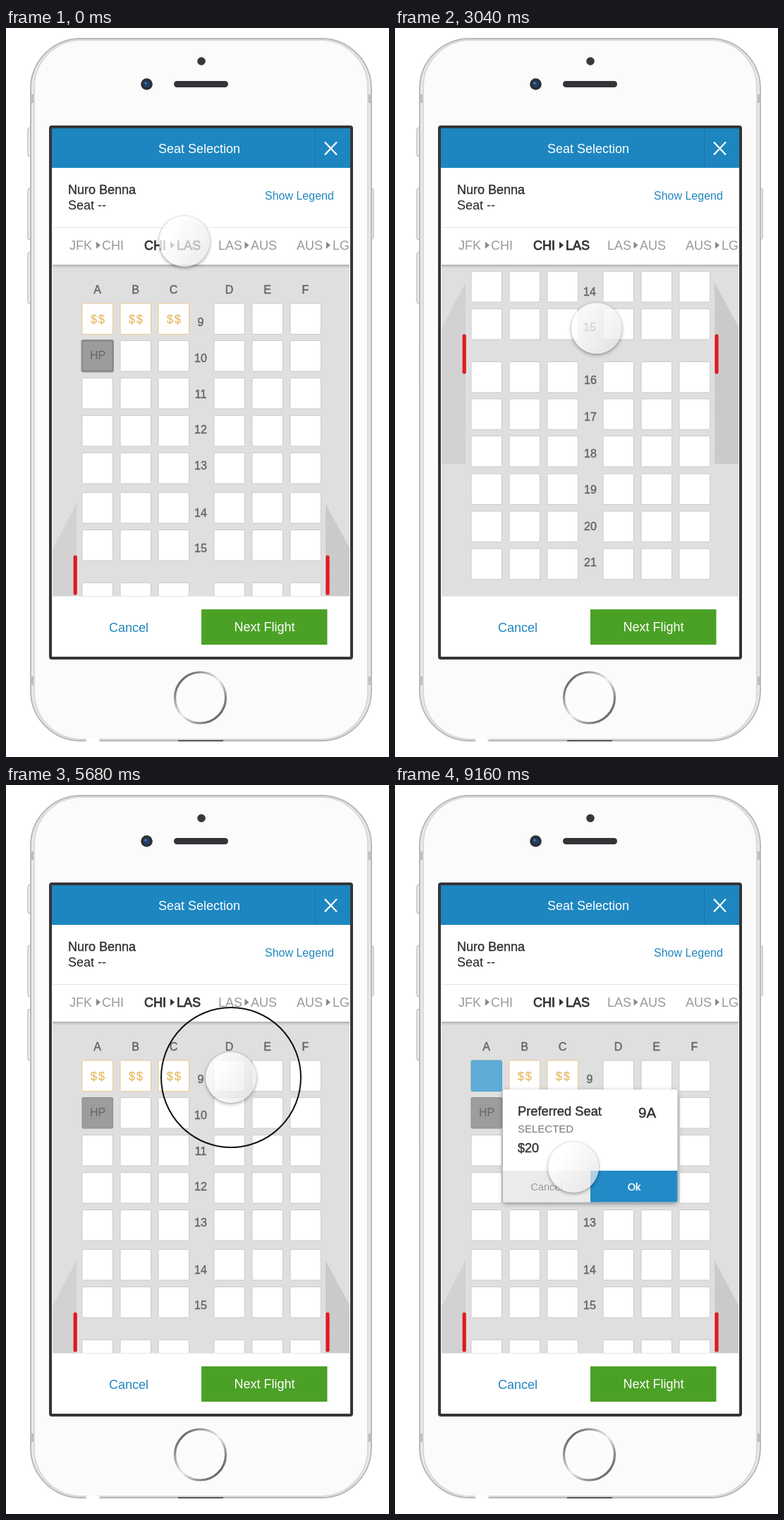
Animation, 543 px wide and 1032 px high, one loop 9.24 s. Source, as an HTML page:

```html
<!DOCTYPE html>
<html lang="en">
<head>
<meta charset="utf-8">
<title>Seat Selection</title>
<style>
html, body { margin: 0; width: 100%; height: 100%; overflow: hidden; background: #fff; }
#stage { position: absolute; left: 0; top: 0; width: 543px; height: 1032px; overflow: hidden; }
svg { display: block; }
text { font-family: "Liberation Sans", Arial, sans-serif; font-size: 18px; fill: currentColor; }
.mid { text-anchor: middle; }
.med { stroke: currentColor; stroke-width: .45px; }
.link { color: #2086bd; }
.dark { color: #333; }
.tab { color: #999; }
.grey { color: #666; font-size: 16px; }
.card { filter: drop-shadow(0 2px 3px rgba(0,0,0,.38)); }
#ring, #cursor { position: absolute; left: 0; top: 0; border-radius: 50%; }
#ring { width: 200px; height: 200px; margin: -100px; box-sizing: border-box; }
#cursor {
  width: 72px; height: 72px; margin: -36px;
  background: linear-gradient(125deg, rgba(255,255,255,.78) 25%, rgba(232,232,232,.72) 85%);
  box-shadow: 0 2px 5px rgba(0,0,0,.32), 0 0 2px rgba(0,0,0,.22);
}
</style>
</head>
<body>
<div id="stage">
<svg width="543" height="1032" viewBox="0 0 543 1032">
  <defs>
    <linearGradient id="metal" x2="1" y2="1">
      <stop offset="0" stop-color="#333"/><stop offset=".3" stop-color="#aaa"/>
      <stop offset=".5" stop-color="#eee"/><stop offset=".75" stop-color="#888"/>
      <stop offset="1" stop-color="#444"/>
    </linearGradient>
    <linearGradient id="shade" x2="0" y2="1">
      <stop offset="0" stop-color="#000" stop-opacity=".22"/><stop offset="1" stop-color="#000" stop-opacity="0"/>
    </linearGradient>
    <linearGradient id="wing" x2="1" y2="0">
      <stop offset="0" stop-color="#d2d2d2"/><stop offset="1" stop-color="#cacaca"/>
    </linearGradient>
    <clipPath id="map"><rect x="66" y="335" width="421" height="469"/></clipPath>
    <clipPath id="screen"><rect x="66" y="142" width="420.5" height="748"/></clipPath>
  </defs>

  <!-- phone -->
  <g fill="#eee" stroke="#aaa">
    <rect x="31" y="141.5" width="5" height="40" rx="2"/>
    <rect x="31" y="227.5" width="5" height="72" rx="2"/>
    <rect x="31" y="317.5" width="5" height="72" rx="2"/>
    <rect x="516" y="227.5" width="5" height="71" rx="2"/>
  </g>
  <rect x="35" y="15" width="483" height="994" rx="71" fill="#e9e9ea" stroke="#b9b9ba" stroke-width="2"/>
  <path d="M34 94h7v12h-7zM512 94h7v12h-7zM34 918h7v12h-7zM512 918h7v12h-7z" fill="#bdbdbd"/>
  <rect x="40" y="17" width="473" height="990" rx="67" fill="#fbfbfc" stroke="#d9d9db" stroke-width="2"/>
  <path d="M244 1009h64" stroke="#555" stroke-width="2"/>
  <ellipse cx="123" cy="1008" rx="10" ry="3" fill="#fff"/>
  <circle cx="277" cy="47" r="5.8" fill="#38363a"/>
  <rect x="238" y="75" width="77" height="9" rx="4.5" fill="#353337"/>
  <circle cx="199.500" cy="79.500" r="8.300" fill="#2d2f38"/>
  <circle cx="199.500" cy="79.500" r="4.500" fill="#20416b"/>
  <circle cx="198" cy="78" r="1.500" fill="#5c86b8"/>
  <circle cx="275.500" cy="948" r="36" fill="#fcfcfd" stroke="url(#metal)" stroke-width="3.200"/>
  <rect x="63" y="140" width="427" height="752" rx="2" fill="#fff" stroke="#353538" stroke-width="4"/>

  <!-- seat map -->
  <g clip-path="url(#map)">
    <rect x="65" y="335" width="423" height="469" fill="#dfdfdf"/>
    <g id="seats">
      <path d="M100 673V930H66V738ZM453 673V930H488V738Z" fill="url(#wing)"/>
      <path d="M98.200 749V800M456 749V800" stroke="#e01a1f" stroke-width="5.200" stroke-linecap="round"/>
    </g>
    <rect x="65" y="335" width="423" height="5" fill="url(#shade)"/>
  </g>

  <!-- header, tabs and footer -->
  <rect x="65" y="142" width="423" height="56" fill="#1d86c0"/>
  <path d="M438.500 142v56" stroke="#1874a8"/>
  <path d="M452 161.500l17 18m0-18l-17 18" stroke="#fff" stroke-width="2.300"/>
  <text class="mid" x="274" y="177" color="#fff">Seat Selection</text>
  <text class="dark med" x="88" y="235">Nuro Benna</text>
  <text x="88" y="256.500" color="#222">Seat --</text>
  <text class="link" x="367" y="243" style="font-size:16px">Show Legend</text>
  <path d="M66 282.500h421" stroke="#e4e4e4"/>
  <g id="tabs" clip-path="url(#screen)"></g>
  <path d="M66 804.500h421" stroke="#e8e8e8"/>
  <text class="link mid" x="174" y="855">Cancel</text>
  <rect x="277" y="823" width="178.500" height="50" fill="#4ba126"/>
  <text class="mid" x="366.500" y="854" color="#fff">Next Flight</text>

  <!-- pop-ups -->
  <g id="dialog">
    <g class="card"><rect x="153" y="431" width="247.500" height="159.500" rx="3" fill="#fff"/></g>
    <path d="M153 546h124v44.500h-121a3 3 0 0 1-3-3z" fill="#ebebeb"/>
    <path d="M277 546h123.500v41.500a3 3 0 0 1-3 3H277z" fill="#228ac6"/>
    <text class="dark med" x="174" y="468" style="font-size:18.300px">Preferred Seat</text>
    <text class="dark med" x="345" y="471" style="font-size:20.500px">9A</text>
    <text x="174" y="492" color="#777" style="font-size:15px">SELECTED</text>
    <text class="dark med" x="174" y="520">$20</text>
    <text class="mid" x="215" y="574" color="#999" style="font-size:14.500px">Cancel</text>
    <text class="mid med" x="339" y="574" color="#fff" style="font-size:14.500px">Ok</text>
  </g>
  <g id="tip">
    <g class="card"><rect x="276" y="402" width="93" height="71" rx="2" fill="#fff"/></g>
    <text class="dark mid med" x="322.500" y="433">9D</text>
    <text class="mid" x="322.500" y="452" color="#666" style="font-size:12.800px">SELECTED</text>
  </g>
</svg>
<div id="ring"></div>
<div id="cursor"></div>
</div>
<script>
const LOOP = 9240;
const $ = id => document.getElementById(id);

function add(parent, tag, attrs, label) {
  const el = document.createElementNS('http://www.w3.org/2000/svg', tag);
  for (const k in attrs) el.setAttribute(k, attrs[k]);
  if (label !== undefined) el.textContent = label;
  parent.appendChild(el);
  return el;
}

// Smooth monotone curve through [time, value] points.
function track(...pts) {
  const n = pts.length;
  const slope = i => (pts[i + 1][1] - pts[i][1]) / (pts[i + 1][0] - pts[i][0]);
  const tan = pts.map((p, i) => {
    if (i === 0 || i === n - 1) return 0;
    const a = slope(i - 1), b = slope(i);
    return a * b > 0 ? 2 * a * b / (a + b) : 0;
  });
  return t => {
    if (t <= pts[0][0]) return pts[0][1];
    if (t >= pts[n - 1][0]) return pts[n - 1][1];
    let i = 0;
    while (t > pts[i + 1][0]) i++;
    const [t0, a] = pts[i], [t1, b] = pts[i + 1];
    const h = t1 - t0, u = (t - t0) / h, u2 = u * u, u3 = u2 * u;
    return a * (2 * u3 - 3 * u2 + 1) + b * (3 * u2 - 2 * u3)
      + h * (tan[i] * (u3 - 2 * u2 + u) + tan[i + 1] * (u3 - u2));
  };
}

// Seats
const seats = $('seats');
const cols = [108, 162, 216, 295, 349, 403];
const rowTops = [390, 442.5, 495.5, 548.5, 601.5, 657.5, 710.5, 785.5, 838, 890.5, 944, 997, 1050];
const rowBases = [422, 473, 524, 574, 625, 692, 742, 817, 869, 921, 972, 1024, 1075];
const seat = (x, y, fill, stroke) =>
  add(seats, 'rect', { x, y, width: 43.5, height: 43.5, rx: 1.5, fill, stroke });

cols.forEach((x, i) =>
  add(seats, 'text', { class: 'mid med grey', x: x + 21.5, y: 376 }, 'ABCDEF'[i]));
let hp;
rowTops.forEach((y, r) => {
  add(seats, 'text', { class: 'mid med grey', x: r < 7 ? 276 : 277, y: rowBases[r] }, r + 9);
  cols.forEach((x, c) => {
    if (r === 1 && c === 0) {
      hp = seat(x, y, '#9c9c9c', '#8d8d8d');
      add(seats, 'text', { class: 'mid grey', x: x + 22, y: 469 }, 'HP');
      return;
    }
    const paid = r === 0 && c < 3;
    seat(x, y, '#fff', paid ? '#ecca8c' : '#cbcbcb');
    if (paid) add(seats, 'text', {
      class: 'mid med', x: x + 23, y: 417.5, color: '#e9bf70',
      style: 'font-size:16px;letter-spacing:2px'
    }, '$$');
  });
});
const seatD = seat(cols[3], 390, '#5eadd8', '#55a2cc');
const seatA = seat(cols[0], 390, '#5eadd8', '#55a2cc');

// Flight tabs: start x, arrow x, end x
[['JFK', 'CHI', 90, 128, 136], ['CHI', 'LAS', 196, 233, 242],
 ['LAS', 'AUS', 301, 338.5, 347], ['AUS', 'LGA', 412, 454, 463]].forEach(([from, to, x, ax, x2], i) => {
  const on = i === 1, cls = on ? 'dark med' : 'tab';
  const style = on ? 'stroke-width:.8px' : '';
  add($('tabs'), 'text', { class: cls, x, y: 314, style }, from);
  add($('tabs'), 'path', { d: `M${ax} 302.500l6 5-6 5z`, fill: on ? '#333' : '#888' });
  add($('tabs'), 'text', { class: cls, x: x2, y: 314, style }, to);
});

// Motion
const scroll = track([1800, 0], [2360, -187], [2660, -257], [3050, -313],
  [4020, -313], [4300, -206], [4780, 0]);
const cursorX = track([1120, 253], [1600, 308], [1800, 310], [2360, 305], [2660, 303],
  [3500, 266], [4350, 266], [5200, 319], [6250, 319], [7050, 131], [8580, 131], [9140, 253]);
const cursorY = track([1120, 302], [1600, 468], [1800, 532], [2360, 345], [2660, 275],
  [2920, 365], [3500, 633], [4020, 633], [4300, 740], [4450, 740], [5200, 414],
  [8580, 414], [9140, 541]);
const tipIn = track([5740, 0], [5960, 1]);
const tipOut = track([7620, 1], [7680, .88], [7840, 0]);
const dialogIn = track([7570, 0], [7680, .72], [7840, 1]);
const seatOn = track([7640, 0], [7840, 1]);
const taps = [5420, 7280], TAP = 290;

function draw(now) {
  const t = now % LOOP;
  seats.setAttribute('transform', `translate(0 ${scroll(t).toFixed(2)})`);

  const grow = t < 3000 ? 1 : 0;
  hp.setAttribute('stroke-width', 1 + 2 * grow);

  const tip = Math.min(tipIn(t), tipOut(t));
  $('tip').setAttribute('opacity', tip);
  $('tip').setAttribute('transform', `translate(0 ${-24 * (1 - tipIn(t))})`);
  seatD.setAttribute('opacity', tip);
  seatA.setAttribute('opacity', seatOn(t));

  const p = dialogIn(t);
  $('dialog').setAttribute('opacity', p);
  $('dialog').setAttribute('transform', `translate(0 ${-57 * (1 - p)})`);

  const x = cursorX(t), y = cursorY(t);
  $('cursor').style.transform = `translate(${x}px, ${y}px)`;
  const tap = taps.find(s => t >= s && t < s + TAP);
  const ring = $('ring').style;
  ring.display = tap === undefined ? 'none' : 'block';
  if (tap !== undefined) {
    const u = Math.min(1, (t - tap) / 250);
    const r = 100 * (1 - (1 - u) ** 2);
    ring.width = ring.height = 2 * r + 'px';
    ring.margin = -r + 'px';
    ring.border = '2px solid #111';
    ring.transform = `translate(${x}px, ${y}px)`;
  }
}

let start;
function frame() {
  const now = performance.now();
  if (start === undefined) start = now;
  draw(now - start);
  requestAnimationFrame(frame);
}
frame();
</script>
</body>
</html>
```
